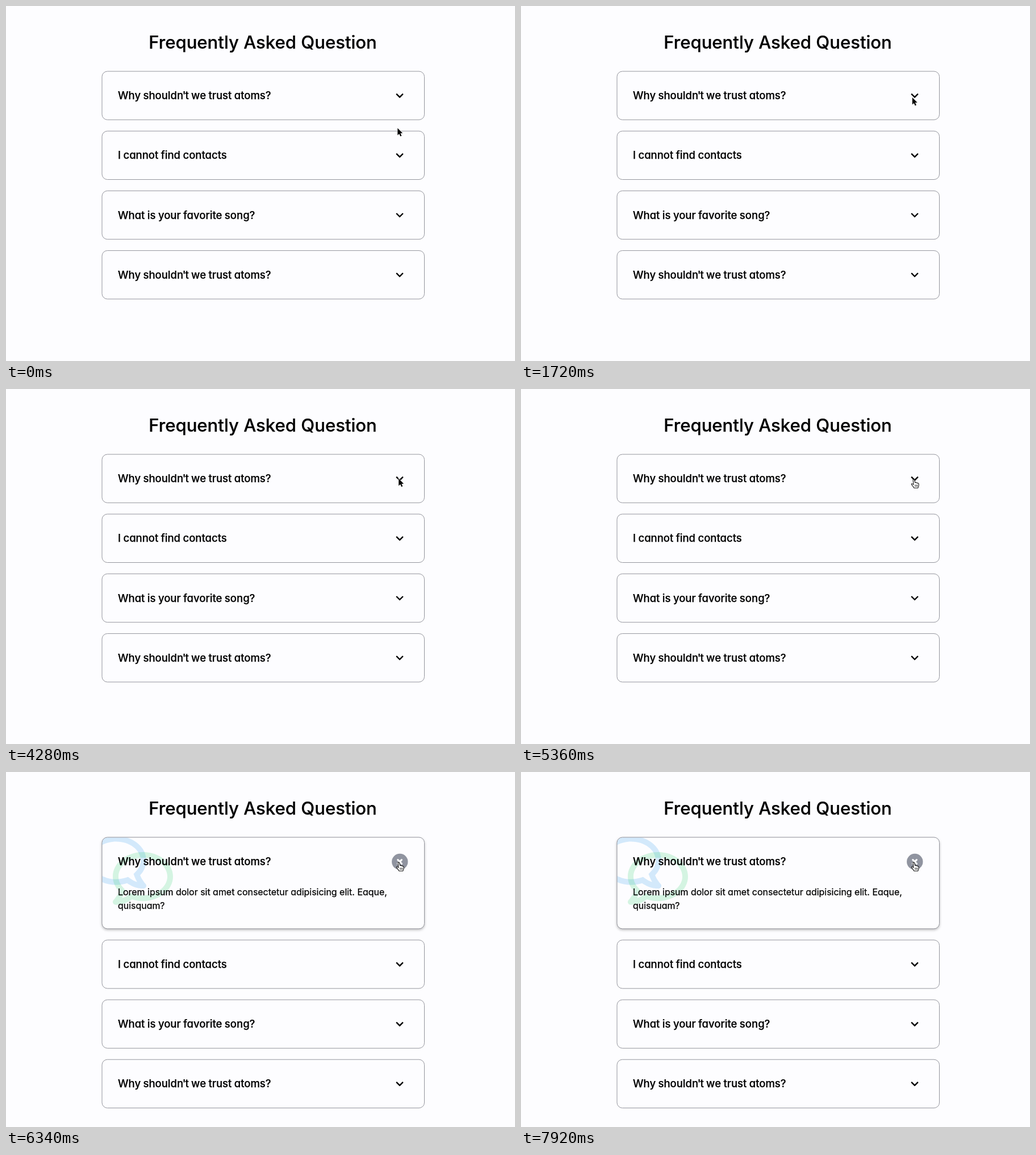
An HTML page that plays this animation: 896x625 px, repeating every 8000 ms.

```html
<!DOCTYPE html>
<html lang="en">
<head>
<meta charset="utf-8">
<title>FAQ accordion</title>
<style>
  html, body { margin: 0; width: 100%; height: 100%; overflow: hidden; background: #fdfdff; }
  svg { display: block; width: 100%; height: 100%; }
  text {
    font-family: Inter, "Open Sans", sans-serif;
    font-optical-sizing: none;
    font-feature-settings: "cv11";
    fill: #000;
    stroke: #000;
    stroke-width: .25px;
  }
  .title { font-size: 31.1px; font-weight: 500; text-anchor: middle; }
  .question { font-size: 18.5px; font-weight: 500; word-spacing: -.5px; }
  .tight { letter-spacing: -1.2px; }
  .answer { font-size: 15.95px; }
  .card { fill: #fdfdff; stroke: #94959d; }
  .raised .card { filter: drop-shadow(0 2.5px 2px rgba(0, 0, 0, .26)); }
  .close { fill: none; stroke: #fff; stroke-width: 3.2; stroke-linecap: round; }
</style>
</head>
<body>
<svg viewBox="0 0 896 625">
  <defs>
    <clipPath id="cardClip"><rect x="169.5" y="115.5" width="566.5" height="160" rx="9"/></clipPath>
    <path id="bubble" d="M256 32C114.6 32 0 125.1 0 240c0 47.6 19.9 91.2 52.9 126.3C38 405.7 7 439.1 6.5 439.5c-6.6 7-8.4 17.2-4.6 26S14.4 480 24 480c61.5 0 110-25.7 139.1-46.3C192 442.8 223.2 448 256 448c141.4 0 256-93.1 256-208S397.4 32 256 32zm0 368c-26.7 0-53.1-4.1-78.4-12.1l-22.7-7.2-19.5 13.8c-14.3 10.1-33.9 21.4-57.5 29 7.3-12.1 14.4-25.7 19.9-40.2l10.6-28.1-20.6-21.8C69.7 314.1 48 282.2 48 240c0-88.2 93.3-160 208-160s208 71.8 208 160-93.3 160-208 160z"/>
    <path id="chevron" d="M207 381.5L12.7 187.1c-9.4-9.4-9.4-24.6 0-33.9l22.7-22.7c9.4-9.4 24.5-9.4 33.9 0L224 284.5l154.7-154c9.4-9.3 24.5-9.3 33.9 0l22.7 22.7c9.4 9.4 9.4 24.6 0 33.9L241 381.5c-9.4 9.4-24.6 9.4-34 0z"/>
  </defs>
  <text class="title" x="452" y="74.8">Frequently Asked Question</text>
  <g id="cards"></g>
  <g id="arrow">
    <path d="M0 0V12.6L2.9 9.9 4.9 14.4 7.1 13.4 5.1 9.1 8.9 8.9Z" fill="#050505" stroke="#fff" stroke-width="1.1" paint-order="stroke"/>
  </g>
  <g id="hand" transform="translate(691.3 158.8)" stroke="#111" stroke-linejoin="round" stroke-linecap="round">
    <path d="M-1.2 .8Q0-.6 1.2 .8L2.3 6Q4 4.8 4.6 6.4 6.2 5.6 6.8 7.2 8.6 6.6 8.8 8.6V11Q8.6 13 7.4 15.5H.6Q-.5 13-2.6 11-4.6 8.8-3.6 8-2.4 7.6-.4 9.5Z" fill="#fff" stroke-width="1.1"/>
    <path d="M2.5 10v3M4.5 10v3M6.4 10v3" fill="none" stroke-width=".8"/>
  </g>
</svg>
<script>
const LOOP = 8000, OPEN_AT = 5380, HAND_AT = 4600;
const CARD_TOP = 115, CARD_PITCH = 105.2, CARD_HEIGHT = 85.3, OPEN_EXTRA = 75.6;
const ATOMS = `Why should<tspan class="tight">n'</tspan>t we trust atoms?`;
const QUESTIONS = [ATOMS, "I cannot find contacts", "What is your favorite song?", ATOMS];
const byId = id => document.getElementById(id);

const chevron = '<use href="#chevron" transform="translate(686.4 150.4) scale(.0296)"/>';
const bubbles = `
  <g clip-path="url(#cardClip)" fill-opacity=".2">
    <use href="#bubble" fill="#2896ec" transform="translate(247 106) scale(-.207 .207)"/>
    <use href="#bubble" fill="#2ecc71" transform="translate(188 134.4) scale(.207)"/>
  </g>`;
const answer = `
  <text class="answer" x="197" y="217">Lorem ipsum dolor sit amet consectetur adipisicing elit. Eaque,</text>
  <text class="answer" x="197" y="240.6">quisquam?</text>
  <circle cx="693.3" cy="158" r="14.2" fill="#9094a0"/>
  <path class="close" d="M689.8 154.7l6.6 6.6m0-6.6l-6.6 6.6"/>`;

// Every card is drawn at the top slot and shifted down to its own.
function card(question, index, open) {
  const shift = index * CARD_PITCH + (open && index ? OPEN_EXTRA : 0);
  const expanded = open && index === 0;
  const height = CARD_HEIGHT + (expanded ? OPEN_EXTRA : 0);
  return `<g transform="translate(0 ${shift})" class="${expanded ? "raised" : ""}">
    <rect class="card" x="169" y="${CARD_TOP}" width="567.5" height="${height}" rx="9.5"/>
    ${expanded ? bubbles : ""}
    <text class="question" x="197" y="164.3">${question}</text>
    ${expanded ? answer : chevron}
  </g>`;
}

function ease(t, start, end) {
  const p = Math.min(1, Math.max(0, (t - start) / (end - start)));
  return p * p * (3 - 2 * p);
}

let wasOpen;
function render(t) {
  const open = t >= OPEN_AT;
  if (open !== wasOpen) {
    byId("cards").innerHTML = QUESTIONS.map((q, i) => card(q, i, open)).join("");
    wasOpen = open;
  }
  const rise = ease(t, 250, 1600), settle = ease(t, 1750, 2450);
  const x = 689.3 - 0.5 * rise + 2.4 * settle;
  const y = 215 - 54 * rise - 3.2 * settle;
  byId("arrow").setAttribute("transform", `translate(${x} ${y})`);
  byId("arrow").style.display = t < HAND_AT ? "" : "none";
  byId("hand").style.display = t < HAND_AT ? "none" : "";
}

const start = performance.now();
function frame() {
  render((performance.now() - start) % LOOP);
  requestAnimationFrame(frame);
}
frame();
</script>
</body>
</html>
```
